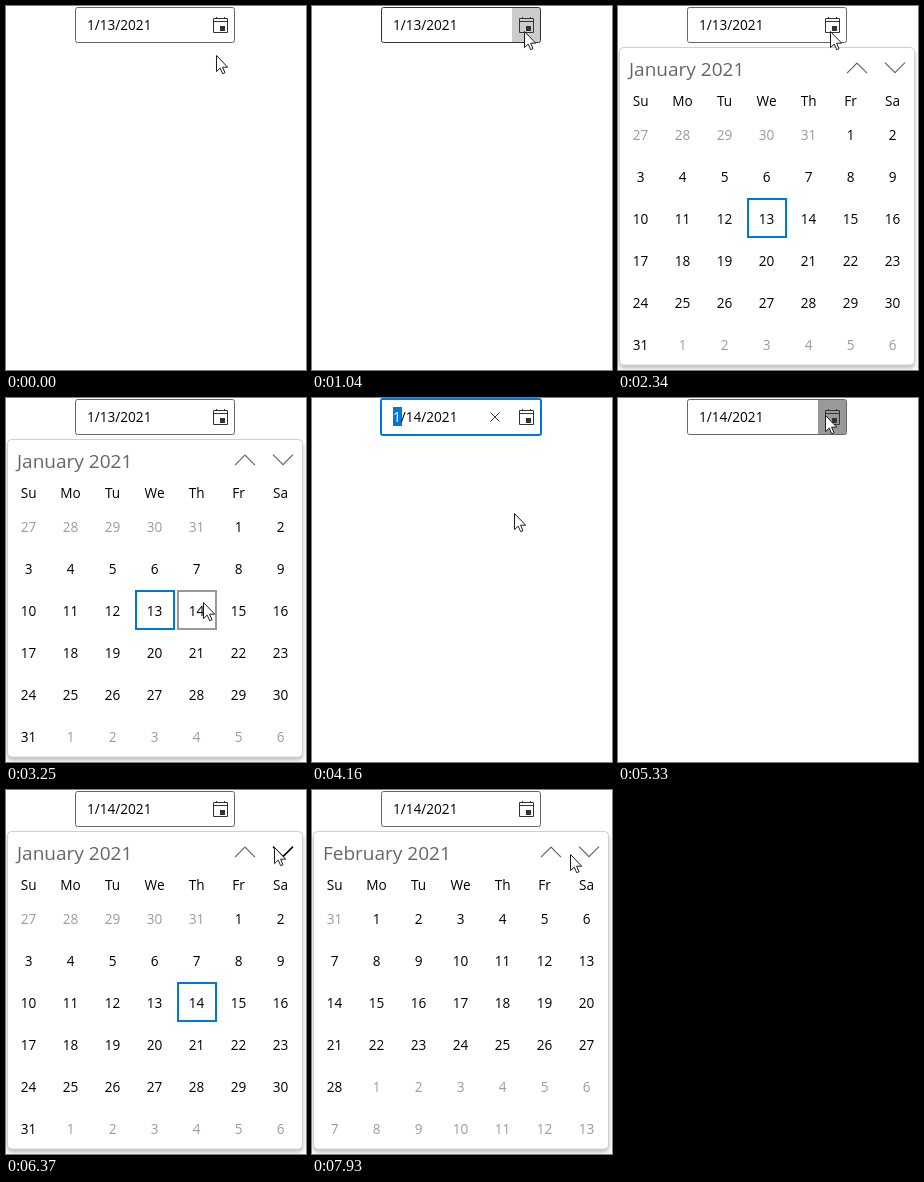
Animation of 300x364 px, one loop 8000 ms. Source, as an HTML page:

```html
<!DOCTYPE html>
<html lang="en">
<head>
<meta charset="utf-8">
<title>Calendar date picker</title>
<style>
  html, body { margin: 0; width: 100%; height: 100%; overflow: hidden; background: #fff; }
  svg { display: block; width: 300px; height: 364px; }
  text { font: 13.6px "Open Sans", "Noto Sans", sans-serif; fill: #000; white-space: pre; }
  .title { font-size: 19px; fill: #666; }
  .mid { text-anchor: middle; }
  .out { fill: #9b9b9b; }
  .line { fill: none; stroke: #666; }
  .panel { fill: #fff; stroke: #cfcfcf; filter: drop-shadow(0 3px 2px rgba(0, 0, 0, .25)); }
</style>
</head>
<body>
<svg id="stage" viewBox="0 0 300 364">
  <rect id="button" x="200" y="2" width="28" height="34"/>
  <rect id="border" class="line" rx="2"/>
  <g id="focus">
    <rect x="81" y="9" width="9" height="19" fill="#0078d7"/>
    <path d="M178.5 14.5l9 9m0-9l-9 9" stroke="#333"/>
  </g>
  <text x="81" y="24"><tspan id="month">1</tspan><tspan id="rest"></tspan></text>
  <path d="M207.5 12.5h14v14h-14zM207.5 15.5h14M210.5 11v2M218.5 11v2" fill="none" stroke="#333"/>
  <rect x="214" y="20" width="5" height="5" fill="#333"/>
  <g id="popup">
    <rect class="panel" x="1.5" y="41.5" width="295" height="317.5" rx="4"/>
    <text id="title" class="title" x="11" y="70"></text>
    <path class="line" d="M229 67.2l10-10 10 10" stroke-width="1.2"/>
    <path id="next" class="line" d="M267 56.6l10 10 10-10"/>
    <g id="days"></g>
    <rect id="hover" class="line" width="38" height="38" stroke-width="2"/>
    <rect id="chosen" class="line" width="38" height="38" stroke-width="2" style="stroke:#0078d7"/>
  </g>
  <path id="cursor" d="M.5 .5V16.6L4.2 13.1 6.7 18.7 9 17.7 6.6 12.2H11.7Z" fill="#fff" stroke="#1c1c28"/>
</svg>
<script>
const LOOP = 8000, STEP = 130, CELL = 42;
const PRESSES = [1560, 4940], HOLD = 390;   // button held down
const DELAY = 260, SLIDE = 390;             // calendar appears, comes to rest
const PICK = 3770, NEXT_MONTH = 7150;

const start = [210, 49];
const moves = [
  { from: 520, to: 1040, at: [212, 25] },   // button
  { from: 2340, to: 3380, at: [196, 212] }, // day 14
  { from: 3770, to: 4550, at: [207, 17] },  // button again
  { from: 5330, to: 5590, at: [214, 27] },
  { from: 5590, to: 6240, at: [268, 56] },  // next month
  { from: 6240, to: 6890, at: [270, 61] },
  { from: 7670, to: 7930, at: [258, 64] }
];

const $ = id => document.getElementById(id);
const set = (el, attrs) => { for (const k in attrs) el.setAttribute(k, attrs[k]); };
const show = (el, on) => set(el, { visibility: on ? "visible" : "hidden" });
const clamp = v => Math.min(1, Math.max(0, v));
const ease = k => k * k * (3 - 2 * k);

function pointerAt(t) {
  return moves.reduce((pos, { from, to, at }) => {
    const k = ease(clamp((t - from) / (to - from)));
    return pos.map((v, i) => v + (at[i] - v) * k);
  }, start).map(Math.round);
}

function addText(col, y, value) {
  const el = document.createElementNS("http://www.w3.org/2000/svg", "text");
  set(el, { x: 22.6 + CELL * col, y, class: "mid" });
  el.textContent = value;
  $("days").append(el);
  return el;
}

"Su Mo Tu We Th Fr Sa".split(" ").forEach((day, i) => addText(i, 100, day));
const cells = Array.from({ length: 42 }, (_, i) =>
  addText(i % 7, 134 + CELL * Math.floor(i / 7), ""));

let shown = -1;
function showMonth(m) {
  if (m === shown) return;
  shown = m;
  $("title").textContent = ["January", "February"][m] + " 2021";
  const offset = new Date(2021, m, 1).getDay();
  cells.forEach((el, i) => {
    const date = new Date(2021, m, 1 - offset + i);
    el.textContent = date.getDate();
    el.classList.toggle("out", date.getMonth() !== m);
  });
}

function placeCell(el, col, row, on) {
  set(el, { x: 4 + CELL * col, y: 109 + CELL * row });
  show(el, on);
}

function drawField(t, over, picked, press) {
  const focus = picked && t < PRESSES[1] + HOLD;
  const held = t >= press && t < press + HOLD + DELAY;
  set($("button"), { fill: held ? "#999" : over ? "#ccc" : "none" });
  const w = focus ? 2 : 1, inset = w === 2 ? 0 : .5;
  set($("border"), {
    x: 69 + inset, y: 1 + inset, width: 160 - 2 * inset, height: 36 - 2 * inset, "stroke-width": w
  });
  const released = t >= press + HOLD;
  $("border").style.stroke = focus ? "#0078d7" : over && !released ? "#333" : "#666";
  show($("focus"), focus);
  $("month").style.fill = focus ? "#fff" : "#000";
  $("rest").textContent = picked ? "/14/2021" : "/13/2021";
}

function drawPopup(age, open, x, y, picked, month) {
  const shift = -18 * (1 - clamp(age / SLIDE)) ** 2;
  set($("popup"), { transform: `translate(0 ${Math.round(shift)})` });
  $("popup").style.display = open ? "" : "none";
  showMonth(month);
  placeCell($("chosen"), picked ? 4 : 3, 2, month === 0);
  const col = Math.floor((x - 3) / CELL), row = Math.floor((y - 108) / CELL);
  placeCell($("hover"), col, row, !picked && row >= 0);
  $("hover").style.stroke = "#999";
  const onNext = x >= 260 && y > 42;
  $("next").style.stroke = onNext ? "#000" : "#666";
  $("next").style.strokeWidth = onNext ? 1.5 : 1.2;
}

function draw(time) {
  const t = Math.floor(time / STEP) * STEP;
  const [x, y] = pointerAt(t);
  const picked = t >= PICK;
  const press = PRESSES[picked ? 1 : 0];
  const age = t - press - HOLD;
  const open = age >= DELAY;

  set($("cursor"), { transform: `translate(${x} ${y})` });
  drawField(t, !open && y < 37, picked, press);
  drawPopup(age, open, x, y, picked, t >= NEXT_MONTH ? 1 : 0);
}

const began = performance.now();
function tick() {
  draw((performance.now() - began) % LOOP);
  requestAnimationFrame(tick);
}
tick();
</script>
</body>
</html>
```
